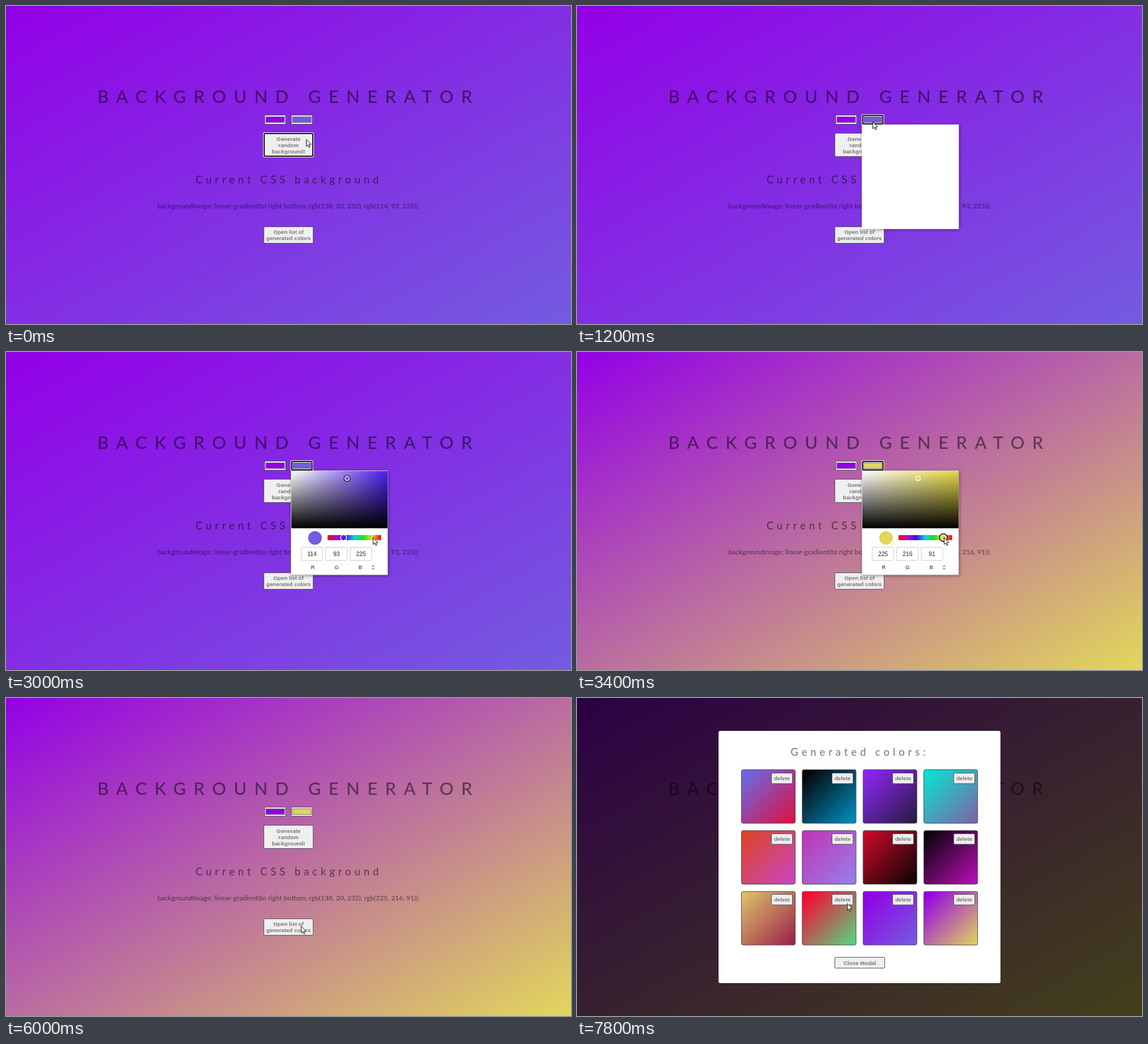
Write an HTML page with a canvas that moves like this. It is 998x561 px and loops after 8000 ms.

```html
<!DOCTYPE html>
<html lang="en">
<head>
<meta charset="utf-8">
<title>Background generator</title>
<style>
  html, body { margin: 0; width: 100%; height: 100%; overflow: hidden; background: #8523de; }
  canvas { display: block; width: 998px; height: 561px; }
</style>
</head>
<body>
<canvas id="stage" width="998" height="561"></canvas>
<script>
const W = 998, H = 561, LOOP = 8000, TICK = 200;
const ctx = document.getElementById('stage').getContext('2d');

const HEAD = 'Lato, sans-serif';
const UI = '"Liberation Sans", Arial, sans-serif';
const INK = 'rgba(0,0,0,.5)';
const PURPLE = '#9300e7', BLUE = '#735ce0', YELLOW = '#e2d75b';

const AT = { focus: 1000, popup: 1200, picker: 1600, pick: 3400, close: 4800, modal: 6200 };

// Cursor stops: time, x, y
const PATH = [
  [0, 530, 235], [200, 530, 235], [1000, 522, 204], [1400, 522, 204],
  [2400, 649, 329], [2600, 649, 329], [3000, 648, 327], [3800, 648, 327],
  [4600, 712, 300], [5000, 712, 300], [6000, 521, 402], [7200, 521, 402],
  [7800, 477, 362], [LOOP, 477, 362]
];

const CARDS = [
  ['#6969e8', '#de103c'], ['#080004', '#0094c4'], ['#8c26f5', '#261a3c'], ['#0ae2d0', '#825fa5'],
  ['#dc4426', '#c846c8'], ['#be37b9', '#9880e8'], ['#c80a28', '#050305'], ['#08020a', '#be0fb9'],
  ['#debe69', '#961e46'], ['#ff0032', '#50dc82'], [PURPLE, BLUE], [PURPLE, YELLOW]
];

function cursorAt(t) {
  const i = PATH.findIndex(p => p[0] > t);
  const [t0, x0, y0] = PATH[i - 1], [t1, x1, y1] = PATH[i];
  const u = (t - t0) / (t1 - t0), k = u * u * (3 - 2 * u);
  return [x0 + (x1 - x0) * k, y0 + (y1 - y0) * k];
}

function box(x, y, w, h, r, fill, stroke) {
  ctx.beginPath();
  ctx.roundRect(x, y, w, h, r);
  if (fill) { ctx.fillStyle = fill; ctx.fill(); }
  if (stroke) { ctx.strokeStyle = stroke; ctx.lineWidth = 1; ctx.stroke(); }
}

function disc(x, y, r, fill, stroke, width = 1) {
  ctx.beginPath();
  ctx.arc(x, y, r, 0, Math.PI * 2);
  if (fill) { ctx.fillStyle = fill; ctx.fill(); }
  if (stroke) { ctx.strokeStyle = stroke; ctx.lineWidth = width; ctx.stroke(); }
}

function text(str, x, y, font, color = INK, spacing = 0) {
  ctx.font = font;
  ctx.letterSpacing = spacing + 'px';
  ctx.textAlign = 'center';
  ctx.fillStyle = color;
  ctx.fillText(str, x, y);
}

// Corner to corner, like CSS "to right bottom"
function diagonal(x, y, w, h, from, to, hold = 0) {
  const k = w * h / (w * w + h * h), dx = h * k, dy = w * k;
  const cx = x + w / 2, cy = y + h / 2;
  const g = ctx.createLinearGradient(cx - dx, cy - dy, cx + dx, cy + dy);
  g.addColorStop(hold, from);
  g.addColorStop(1, to);
  return g;
}

function ramp(x0, y0, x1, y1, colors) {
  const g = ctx.createLinearGradient(x0, y0, x1, y1);
  colors.forEach((c, i) => g.addColorStop(i / (colors.length - 1), c));
  return g;
}

// Form control face; focus adds a white outline and a heavier black edge
function control(x, y, w, h, focused) {
  if (focused) {
    box(x - 1, y - 1, w + 2, h + 2, 3, '#fff');
    box(x, y, w, h, 2.5, '#101010');
    box(x + 2, y + 2, w - 4, h - 4, 1, '#efefef');
  } else {
    box(x + .5, y + .5, w - 1, h - 1, 1.5, '#efefef', '#56505a');
  }
}

function button(x, y, w, h, lines, focused) {
  control(x, y, w, h, focused);
  const first = y + h / 2 + 3.5 - (lines.length - 1) * 5.5;
  lines.forEach((s, i) => text(s, x + w / 2, first + i * 11, 'bold 9.75px ' + UI, '#777'));
}

function colorInput(x, color, focused) {
  control(x, 192, 38, 17, focused);
  box(x + 2.5, 195.5, 33, 10, 0, color, '#777');
}

function page(t, color, rgb) {
  ctx.fillStyle = diagonal(0, 0, W, H, PURPLE, color);
  ctx.fillRect(0, 0, W, H);
  text('BACKGROUND GENERATOR', 499, 171, '500 31px ' + HEAD, INK, 13.4);
  colorInput(456.5, PURPLE, false);
  colorInput(503.5, color, t >= AT.focus && t < AT.close);
  button(455, 224, 88, 42, ['Generate', 'random', 'background!'], t < AT.focus);
  text('Current CSS background', 499.5, 313, '500 18.6px ' + HEAD, INK, 5.85);
  text(`backgroundImage: linear-gradient(to right bottom, rgb(138, 20, 232), rgb(${rgb.join(', ')}));`,
    499, 356.5, '500 12.1px ' + HEAD);
  button(455, 389, 88, 30, ['Open list of', 'generated colors']);
}

function popup(filled, picked, color, rgb) {
  ctx.save();
  ctx.shadowColor = 'rgba(0,0,0,.4)';
  ctx.shadowBlur = 5;
  ctx.shadowOffsetX = ctx.shadowOffsetY = 1;
  box(503, 209, 171.5, 184.5, 0, '#fff');
  ctx.restore();
  if (!filled) return;

  const hue = picked ? '#e6d73f' : '#4b1eee';
  box(503.5, 209.5, 170.5, 183.5, 0, null, 'rgba(0,0,0,.2)');
  box(504, 210, 170, 101, 0, ramp(504, 0, 674, 0, ['#fff', hue]));
  box(504, 210, 170, 101, 0, ramp(0, 210, 0, 311, ['rgba(0,0,0,0)', '#000']));
  if (!picked) disc(602.5, 223, 5, null, '#000', 2);
  disc(602.5, 223, 4, color, '#fff', 1.5);

  disc(545.8, 328, 12, color);
  box(568, 323, 94.5, 9, 1, ramp(568, 0, 662, 0,
    ['#f00', '#b40bc8', '#3a10ee', '#12d0e0', '#18e020', '#e6d73f', '#f00']));
  if (picked) disc(647.3, 327.5, 6.5, null, '#000', 2);
  disc(picked ? 647.3 : 596.3, 327.5, 5.2, hue, '#fff', 1.5);

  rgb.forEach((v, i) => {
    box(521.5 + i * 43.3, 344.5, 38, 23, 1, '#fff', '#ccc');
    text(v, 540.5 + i * 43.3, 359.7, '10.3px ' + UI, '#222');
    text('RGB'[i], 542 + i * 42, 383, '9.5px ' + UI, '#222');
  });
  ctx.strokeStyle = '#222';
  ctx.lineWidth = 1;
  ctx.beginPath();
  for (const s of [-1, 1]) {
    ctx.moveTo(646.3, 380 + s * 1.2);
    ctx.lineTo(648.5, 380 + s * 3.2);
    ctx.lineTo(650.7, 380 + s * 1.2);
  }
  ctx.stroke();
}

function modal() {
  ctx.fillStyle = 'rgba(0,0,0,.7)';
  ctx.fillRect(0, 0, W, H);
  box(250, 58, 498, 445, 3, '#fff');
  text('Generated colors:', 499.5, 102, '500 18.6px ' + HEAD, INK, 5.85);
  CARDS.forEach(([from, to], i) => {
    const x = 290.5 + i % 4 * 107.4, y = 126.5 + Math.floor(i / 4) * 107.4;
    box(x, y, 95, 94.5, 3, diagonal(x, y, 95, 95, from, to, .05), '#4c4650');
    button(Math.round(x + 52), Math.round(y + 5), 38, 19.5, ['delete']);
  });
  button(455, 457, 89, 20, ['Close Modal']);
}

function cursor(x, y) {
  const pts = [[0, 0], [0, 12], [2.8, 9.5], [4.7, 13.7], [6.5, 12.9], [4.7, 8.9], [8.5, 8.7]];
  ctx.beginPath();
  pts.forEach(([px, py]) => ctx.lineTo(x + .5 + px, y + .5 + py));
  ctx.closePath();
  ctx.fillStyle = '#fff';
  ctx.fill();
  ctx.strokeStyle = '#111';
  ctx.lineWidth = 1;
  ctx.stroke();
}

function draw(now) {
  const t = Math.floor(now % LOOP / TICK) * TICK;
  const picked = t >= AT.pick;
  const color = picked ? YELLOW : BLUE;
  const rgb = picked ? [225, 216, 91] : [114, 93, 225];
  page(t, color, rgb);
  if (t >= AT.popup && t < AT.close) popup(t >= AT.picker, picked, color, rgb);
  if (t >= AT.modal) modal();
  cursor(...cursorAt(t));
}

const start = performance.now();
function loop() {
  draw(performance.now() - start);
  requestAnimationFrame(loop);
}
loop();
</script>
</body>
</html>
```
